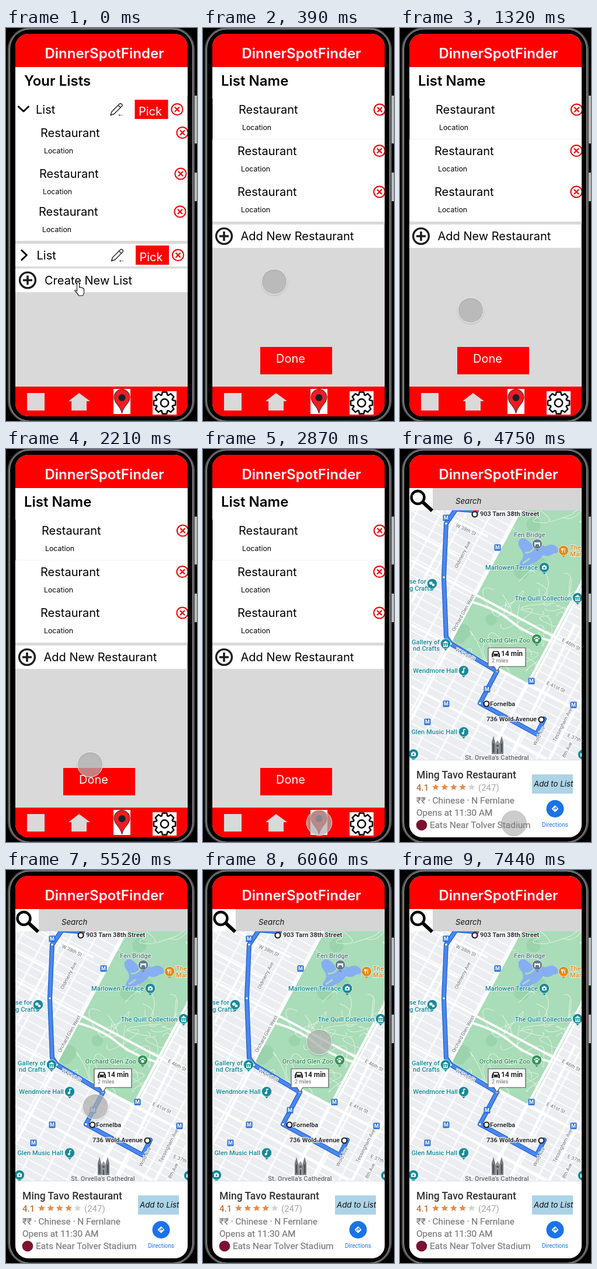
An HTML page that plays this animation: 327x674 px, repeating every 8000 ms.

```html
<!DOCTYPE html>
<html lang="en">
<head>
<meta charset="utf-8">
<title>Restaurant lists</title>
<style>
  html, body { margin: 0; width: 100%; height: 100%; overflow: hidden; background: #000; }
  svg { display: block; width: 327px; height: 674px; font-family: Inter, sans-serif; }
  .map, .card { font-family: Roboto, sans-serif; }
  .poi { font-size: 11.2px; font-weight: 500; stroke: #fff; stroke-width: 2px; stroke-opacity: .65; paint-order: stroke; }
  .street { font-size: 8.6px; fill: #666b70; text-anchor: middle; stroke: #fff; stroke-width: 2px; paint-order: stroke; }
  .stop { font-size: 11px; font-weight: 600; fill: #303236; stroke: #fff; stroke-width: 2px; paint-order: stroke; }
</style>
</head>
<body>
<svg id="stage" viewBox="0 0 327 674"></svg>
<script>
const LOOP = 8000;
const stage = document.getElementById('stage');

// Drawing helpers, each returning SVG markup
const rect = (x, y, w, h, fill, more = '') => `<rect x="${x}" y="${y}" width="${w}" height="${h}" fill="${fill}" ${more}/>`;
const circle = (x, y, r, fill, more = '') => `<circle cx="${x}" cy="${y}" r="${r}" fill="${fill}" ${more}/>`;
const line = (d, color, width, more = '') =>
  `<path d="${d}" fill="none" stroke="${color}" stroke-width="${width}" stroke-linejoin="round" ${more}/>`;
const text = (x, y, label, size, more = '') => `<text x="${x}" y="${y}" font-size="${size}" ${more}>${label}</text>`;
const at = (x, y, body, more = '') => `<g transform="translate(${x} ${y}) ${more}">${body}</g>`;
const times = (n, make) => Array.from({ length: n }, (_, i) => make(i)).join('');

let seed = 7;
const random = () => (seed = (seed * 16807) % 2147483647) / 2147483647;

// Icons
const remove = (x, y) => at(x, y, circle(0, 0, 9.6, '#fff', 'stroke="#f00000" stroke-width="2"')
  + line('M-4-4 4 4M4-4-4 4', '#f00000', 2.2));
const plus = (x, y) => at(x, y, circle(0, 0, 13.4, 'none', 'stroke="#1e1e1e" stroke-width="3.4"')
  + line('M-8 0H8M0-8V8', '#1e1e1e', 3.6));
const pencil = (x, y) => at(x, y, line('M1 21l2-6L16 2q2-2 4 0t0 4L7 19zM14 4l4 4M15 21h3m2 0h1', '#222', 1.4));
const gear = (x, y) => {
  const points = [];
  for (let i = 0; i < 8; i++) {
    [[-.34, 14.5], [-.2, 19], [.2, 19], [.34, 14.5]].forEach(([turn, r]) => {
      const a = i * Math.PI / 4 + turn;
      points.push([(r * Math.cos(a)).toFixed(1), (r * Math.sin(a)).toFixed(1)]);
    });
  }
  return at(x, y, line(`M${points.join('L')}Z`, '#080808', 2.5) + circle(0, 0, 6.7, 'none', 'stroke="#080808" stroke-width="2.5"'));
};

const restaurant = (x, y, crossX) => text(x, y, 'Restaurant', 20) + text(x + 6, y + 28, 'Location', 12.3) + remove(crossX, y - 7);
const listRow = (x, y) => text(x, y, 'List', 20) + pencil(x + 127, y - 18.5)
  + rect(x + 169.5, y - 24, 57, 33, '#f00') + text(x + 176, y + 3, 'Pick', 20, 'fill="#fff"') + remove(x + 242, y - 7.5);
const heading = label => text(31, 99, label, 24, 'font-weight="600"');

const nav = rect(16, 615, 295, 52, '#f00') + rect(36, 626, 30, 30, '#d9d9d9')
  + '<path d="M125 626l19 14h-6v16h-26v-16h-5z" fill="#d9d9d9"/>'
  + rect(184, 619, 29, 43, '#fff')
  + '<path d="M198.500 661C196 648 185 644 185 633a13.500 13.500 0 0 1 27 0C212 644 201 648 198.500 661Z" fill="#ed1c24" stroke="#4a1518"/>'
  + circle(198.5, 634, 6, '#182028')
  + rect(251, 623, 41, 40, '#fff') + gear(271.5, 643);

const listsScreen = rect(16, 67, 295, 298, '#fff') + heading('Your Lists')
  + rect(309.5, 117, 2, 42, '#ccc')
  + line('M20.500 134l9.500 9 9.500-9', '#000', 3) + listRow(51, 147)
  + restaurant(59, 186.5, 302) + restaurant(57, 257, 299) + restaurant(56, 322, 298)
  + rect(16, 370, 295, 39, '#fff') + line('M26 380.500l9.500 9-9.500 9', '#000', 3) + listRow(52.5, 397)
  + rect(16, 412.5, 295, 40.5, '#fff') + plus(37, 432.5) + text(66, 439.5, 'Create New List', 20)
  + '<path d="M121.500 451v-13q0-2 2-2t2 2v7q1.500-1.500 3 .5 2-1 3 1 2-.5 2 2v5q0 2-2 5.500h-7q-2-4-6.500-8-.5-3 3.500 0Z" fill="#fff" stroke="#111" stroke-width="1.100"/>';

const editScreen = rect(16, 67, 295, 265, '#fff') + heading('List Name')
  + rect(16, 190, 295, 1, '#f0f0f0') + rect(16, 121, 1, 70, '#999')
  + restaurant(61, 147, 302.5) + restaurant(59, 217.5, 302) + restaurant(59, 288, 302)
  + rect(16, 337, 293, 40, '#fff') + plus(36, 357) + text(64.5, 364, 'Add New Restaurant', 20)
  + rect(98, 547, 123, 47, '#f00') + text(125, 574, 'Done', 20, 'fill="#fff"');

// Map
const TEAL = '#178a98', SLATE = '#61798a', GREEN = '#34915a', ORANGE = '#e38a16';
const poi = (x, y, label, color = TEAL, anchor = 'start') => `<text class="poi" x="${x}" y="${y}" fill="${color}" text-anchor="${anchor}">${label}</text>`;
const street = (x, y, turn, label) => at(x, y, `<text class="street" y="3">${label}</text>`, `rotate(${turn})`);
const stop = (x, y, label) => `<text class="stop" x="${x}" y="${y}">${label}</text>`;
const glyphs = {
  camera: rect(-4, -2.5, 8, 6, '#fff', 'rx="1"') + rect(-1.5, -4, 3, 2, '#fff') + circle(0, .5, 1.6, TEAL),
  masks: circle(-2, -1, 2.8, '#fff') + circle(2, 2, 2.6, '#fff', `stroke="${TEAL}" stroke-width=".6"`),
  note: circle(-1.4, 2.6, 2, '#fff') + line('M0 3v-7h3', '#fff', 1.5),
  museum: '<path d="M-5-1 0-5l5 4zM-4 4h8v1.500h-8z" fill="#fff"/>' + line('M-3 0v4M0 0v4M3 0v4', '#fff', 1.4),
  fork: line('M-2-4v8M2-4v8M-3.500-4v3h3v-3', '#fff', 1.1),
  paw: circle(0, 2, 2.6, '#fff') + times(4, i => circle(i * 2.4 - 3.6, i % 3 ? -3 : -1, 1.2, '#fff')),
  bridge: line('M-4-3v7M4-3v7M-5 2q5-6 10 0M-5-2h10', '#fff', 1.4)
};
const marker = (x, y, glyph, color = TEAL) =>
  at(x, y, `<path d="M-5 6 0 12 5 6Z" fill="${color}"/>` + circle(0, 0, 8.6, color, 'stroke="#fff" stroke-width=".7"') + glyphs[glyph]);
const station = (x, y) => at(x, y, rect(-5.5, -5.5, 11, 11, '#2b6fd8', 'rx="1.500"')
  + text(0, 3.2, 'M', 9, 'fill="#fff" font-weight="700" text-anchor="middle"'));
const end = (x, y) => circle(x, y, 4.5, '#fff', 'stroke="#1c1c1c" stroke-width="2.200"');

const n = range => Math.round(random() * range);
const footpaths = times(46, () => {
  const bend = () => n(70) - 35;
  return line(`M${n(152)} ${n(360)}q${bend()} ${bend()} ${bend()} ${bend()}t${bend()} ${bend()}`, '#e2f2e2', 1);
});
const park = `<g transform="matrix(.883 .469 .469 -.883 88 332)">`
  + rect(-4, -4, 160, 420, '#fff') + rect(0, 0, 152, 420, '#a9dcb8')
  + `<g clip-path="url(#park)">${times(9, () => circle(n(152), n(340), 10 + n(12), '#9bd3ac'))}${footpaths}</g></g>`;

const lake = '<path d="M203 158q6-9 15-2l11 10q9-5 20 1 13-7 21 3 4 9-7 9-9 7-18 3-9 12-20 15l-15 9q-8-2-4-13 8-9 3-18-8-9-6-17Z" fill="#86aef2"/>'
  + line('M214 178q12 0 16-9m-20 27l12-8', '#a9dcb8', 3);

const route = 'M131 106 96 103 79 128 75 220 79 322 87 334 166 381 137 436 234 489 247 463';
const roads = line('M8 185 320 352M16 300 128 358 311 452M16 140 100 185M16 405 250 533M60 105 150 150M20 262 95 120', '#fff', 4)
  + line('M150 533 320 212M255 533 325 400M16 470 88 332M300 300 186 533', '#fff', 4.5)
  + line('M122 262Q165 274 191 296T264 331', '#f8fbf8', 4);

const church = at(167, 508, '<path d="M-10 15V-5l3-11 3 11v3h8v-3l3-11 3 11v20Z" fill="#777c82"/>'
  + '<path d="M-4-2 0-9l4 7v17h-8Z" fill="#92979c"/>' + line('M-7-3v15M7-3v15M0 6v9', '#44494e', 1.8) + circle(0, 1, 2, '#50565b'));

const car = at(164, 352, '<path d="M-7 5v-5l2.500-5.500h9L7 0v5H5V3.500H-5V5Z" fill="#252525"/>'
  + '<path d="M-4-1l1-3h6l1 3Z" fill="#fff"/>' + circle(-4, 1.3, 1, '#fff') + circle(4, 1.3, 1, '#fff'));

const map = `<g class="map" clip-path="url(#mapArea)">` + rect(16, 105, 295, 429, 'url(#blocks)')
  + park + lake + roads
  + line(route, '#1b5cce', 8, 'stroke-linecap="round"') + line(route, '#4a88f0', 5.6, 'stroke-linecap="round"')
  + [[79, 128], [75, 220], [87, 334], [166, 381], [137, 436]].map(([x, y]) => circle(x, y, 2.3, '#fff', 'stroke="#2a62bd" stroke-width=".8"')).join('')
  + street(113, 138, 25, 'W 38th St') + street(107, 181, -63, 'Oldmerry Ave')
  + street(108, 281, -61, 'Orchard Glen West') + street(112, 352, 28, 'W 21st St')
  + street(293, 335, 28, 'E 46th St') + street(267, 408, 25, 'E 41st St')
  + street(238, 492, -63, 'Wold Ave') + street(278, 473, -63, 'Tessingham Ave')
  + street(303, 497, 22, 'E 37th St') + street(286, 516, -63, '8th Ave')
  + [[79, 118], [167, 169], [225, 398], [149, 412], [79, 437], [47, 468], [297, 439]].map(p => station(...p)).join('')
  + poi(195, 151, 'Fen Bridge', SLATE) + marker(235, 163, 'bridge', SLATE)
  + poi(236, 207, 'Marlowen Terrace', TEAL, 'end') + marker(247, 203, 'camera')
  + poi(294, 260, 'The Quill Collection', TEAL, 'end') + marker(304, 255, 'museum')
  + poi(223, 332, 'Orchard Glen Zoo', GREEN, 'end') + marker(234, 326, 'paw', GREEN)
  + poi(68, 335, 'Gallery of', TEAL, 'end') + poi(68, 346, 'nd Crafts', TEAL, 'end') + marker(78, 334, 'museum')
  + poi(99, 384, 'Wendmore Hall', TEAL, 'end') + marker(109, 380, 'note')
  + poi(98, 489, 'n Glen Music Hall', TEAL, 'end') + marker(109, 485, 'note')
  + poi(16, 231, 'se for') + poi(16, 243, 'g Crafts') + marker(55, 231, 'masks')
  + poi(291, 173, 'The', ORANGE) + poi(291, 184, 'Mar', ORANGE) + marker(280, 174, 'fork', ORANGE)
  + marker(23, 523, 'camera') + marker(313, 524, 'camera')
  + church + poi(166, 533, 'St. Orvella’s Cathedral', '#65696d', 'middle')
  + rect(126, 104, 6, 3, '#e33') + end(128, 112) + end(148, 437) + end(242, 464)
  + stop(137, 115, '903 Tarn 38th Street') + stop(154, 441, 'Fornelba') + stop(148, 467, '736 Wold Avenue')
  + '<path d="M151 341h64v32h-44l-5 8-5-8h-10Z" fill="#fff" stroke="#555" stroke-width="1.200"/>'
  + car + text(173, 355, '14 min', 12, 'font-weight="700" fill="#222"') + text(157, 366, '2 miles', 8.8, 'fill="#666"') + '</g>';

const search = rect(16, 67, 295, 38, '#d5d5d5') + rect(16, 67, 40, 38, '#fff')
  + circle(30.5, 83, 11, 'none', 'stroke="#050505" stroke-width="4.500"') + line('M39 91 55 106', '#050505', 6)
  + text(95, 94, 'Search', 13.2, 'font-style="italic" fill="#111"');

const star = fill => `<path d="M0-6 1.800-2 6-1.800 2.800 1 3.800 5 0 2.800-3.800 5-2.800 1-6-1.800-1.800-2Z" fill="${fill}"/>`;
const card = '<g class="card">' + rect(16, 534, 295, 133, '#fff') + rect(16, 533, 295, 1, '#dde0e2')
  + text(28, 565, 'Ming Tavo Restaurant', 17.6, 'fill="#333" font-weight="500"')
  + text(28, 586, '4.1', 15, 'fill="#bb7038" font-weight="500"')
  + times(5, i => at(61 + i * 15.4, 580, star(i < 4 ? '#e88b45' : '#d4d4d4')))
  + text(134, 586, '(247)', 15, 'fill="#a5a5a5"')
  + `<g fill="#7d7d7d" stroke="#7d7d7d" stroke-width=".25">` + text(28, 608, '₹₹ · Chinese · N Fernlane', 15.4)
  + text(28, 629, 'Opens at 11:30 AM', 15.4) + text(51, 650, 'Eats Near Tolver Stadium', 15.4) + '</g>'
  + circle(37, 645, 9.3, '#7c1230')
  + rect(226, 558, 70, 33, '#add3e6')
  + text(229, 579, 'Add to List', 13.3, 'font-style="italic" font-family="Inter, sans-serif" fill="#111"')
  + circle(265.5, 617, 15, '#1a73e8') + rect(-4.3, -4.3, 8.6, 8.6, '#fff', 'rx="1" transform="translate(265.500 617) rotate(45)"')
  + line('M263.500 619v-3h4m-1.500-2 2 2-2 2', '#1a73e8', 1.2)
  + text(265.5, 648, 'Directions', 10, 'fill="#1a73e8" text-anchor="middle"') + '</g>';

const phone = rect(0, 0, 327, 674, '#000')
  + rect(320, 116, 9, 82, 'url(#metal)', 'rx="2"') + rect(320, 248, 9, 49, 'url(#metal)', 'rx="2"')
  + rect(5, 1, 316, 674, '#000', 'rx="36" stroke="#565858" stroke-width="4"')
  + rect(6.5, 2, 313, 672, '#000', 'rx="34" stroke="#a5a8a8" stroke-width="1"');

stage.innerHTML = `<defs>
  <linearGradient id="metal"><stop offset="0" stop-color="#555"/><stop offset=".5" stop-color="#c9c9c9"/><stop offset="1" stop-color="#888"/></linearGradient>
  <pattern id="blocks" width="38" height="14" patternUnits="userSpaceOnUse" patternTransform="rotate(28)">
    ${rect(0, 0, 38, 14, '#fbfcfd') + rect(1.5, 1, 35, 12, '#ebedf0')}</pattern>
  <clipPath id="park"><rect width="152" height="420"/></clipPath>
  <clipPath id="mapArea"><rect x="16" y="105" width="295" height="429"/></clipPath>
  <clipPath id="screen"><rect x="16" y="10" width="295" height="656" rx="22"/></clipPath>
  <filter id="shadow" x="-30%" y="-30%" width="160%" height="160%"><feDropShadow dx="0" dy="1.5" stdDeviation="1.3" flood-opacity=".3"/></filter>
</defs>${phone}<g clip-path="url(#screen)">
  ${rect(16, 10, 295, 656, '#d9d9d9') + rect(16, 10, 295, 57, '#f00')}
  ${text(168.5, 51.5, 'DinnerSpotFinder', 24, 'fill="#fff" font-weight="600" text-anchor="middle"')}
  ${nav}
  <g id="lists">${listsScreen}</g><g id="edit">${editScreen}</g><g id="places">${map + search + card}</g>
  <g id="touch">
    <g id="idle">${circle(0, 0, 21.6, 'none', 'stroke="#fff" stroke-width="1" filter="url(#shadow)"')
      + circle(0, 0, 21.5, '#afafaf', 'fill-opacity=".73"')}</g>
    <g id="pressed">${circle(0, 0, 21.6, '#808080', 'fill-opacity=".4" stroke="#999" stroke-opacity=".5" stroke-width=".8"')}</g>
  </g></g>`;

// Holds each value until the next time in the table
function play(id, property, table) {
  const frames = table.map(([time, value]) => ({ offset: time / LOOP, [property]: value, easing: 'step-end' }));
  frames.push({ offset: 1, [property]: table[table.length - 1][1] });
  document.getElementById(id).animate(frames, { duration: LOOP, iterations: Infinity });
}

play('lists', 'opacity', [[0, 1], [390, 0]]);
play('edit', 'opacity', [[0, 0], [390, 1], [4750, 0]]);
play('places', 'opacity', [[0, 0], [4750, 1]]);
play('touch', 'opacity', [[0, 0], [390, 1], [7440, 0]]);
play('idle', 'opacity', [[0, 1], [4210, 0], [5280, 1]]);
play('pressed', 'opacity', [[0, 0], [4210, 1], [5280, 0]]);

const touchPath = [
  [0, 122, 435], [930, 113, 414], [1050, 110, 427],
  [1200, 112, 444], [1320, 121, 484], [1440, 133, 522], [1560, 140, 539], [2210, 144, 541],
  [2360, 165, 568], [2480, 199, 613], [2600, 218, 637], [2750, 209, 640], [2870, 199, 641], [2990, 195, 642],
  [5280, 197, 622], [5400, 181, 516], [5520, 153, 406], [5650, 137, 342], [5800, 141, 329],
  [5940, 191, 301], [6060, 199, 295]
];
play('touch', 'transform', touchPath.map(([time, x, y]) => [time, `translate(${x}px, ${y}px)`]));
</script>
</body>
</html>
```
